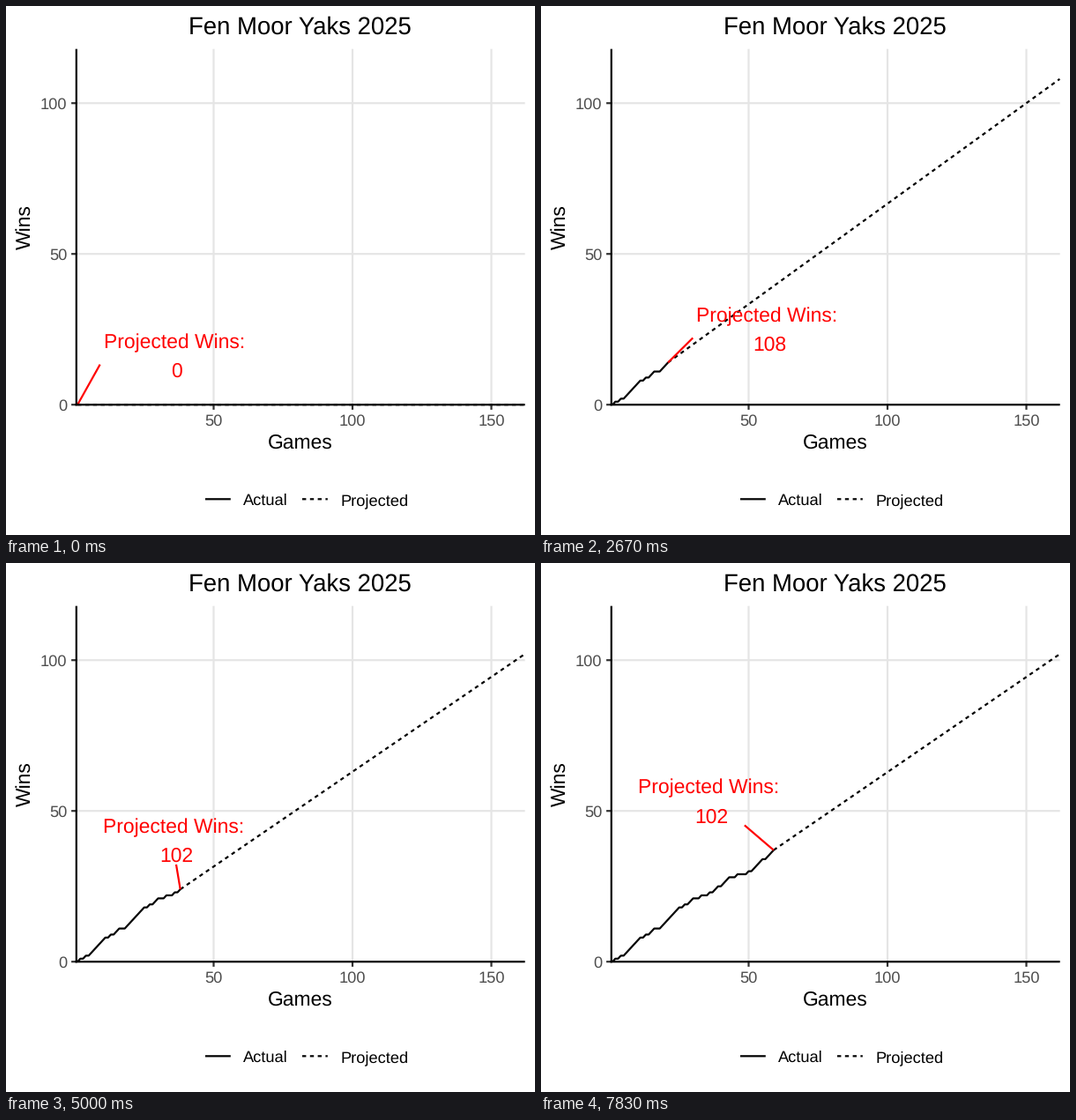
These frames come from a looping animation (600 px wide and 600 px high, 8000 ms). A matplotlib script:

```python
import matplotlib.pyplot as plt
import numpy as np
from matplotlib.animation import FuncAnimation

plt.rcParams["font.family"] = "Liberation Sans"
plt.rcParams["text.hinting"] = "no_hinting"

SIZE, DPI = 600, 100
LOOP, TICK, STEPS = 8000, 40, 48   # loop and tick in ms, chart steps per loop
LEAD = 34                          # ms; keeps steps from lagging a tick
SEASON = 162
PX = 72 / DPI                      # points per pixel
LINE = 2.2 * PX
LEFT, RIGHT, TOP, BOTTOM = 79.8, 588.6, 48.7, 452.2

RESULTS = ("LWLWL" + "W" * 6 + "LWLWWLL" + "W" * 7 + "LWLWW" + "LLWLL"
           + "WLWWL" + "WWWLL" + "WLLLW" + "LWWWW" + "LWWW")
WINS = np.cumsum([r == "W" for r in RESULTS])


def px(game):
    return 78 + 3.15 * game


def py(wins):
    return BOTTOM - 3.42 * wins


fig = plt.figure(figsize=(SIZE / DPI, SIZE / DPI), dpi=DPI, facecolor="white")
ax = fig.add_axes([0, 0, 1, 1])
ax.set_xlim(0, SIZE)
ax.set_ylim(SIZE, 0)
ax.axis("off")


def line(x, y, color="black", z=2, **kw):
    kw = {"lw": LINE, "solid_capstyle": "butt", "dash_capstyle": "butt",
          "solid_joinstyle": "round", "snap": False, **kw}
    return ax.plot(x, y, color=color, zorder=z, **kw)[0]


def text(x, y, s, size, color="black", ha="center", **kw):
    return ax.text(x, y, s, fontsize=size * PX, color=color, ha=ha,
                   va="baseline", **kw)


def draw_chart():
    grid, tick, grey = "#E5E5E5", "#333333", "#4D4D4D"
    for w in (0, 50, 100):
        y = py(w)
        line([LEFT, RIGHT], [y, y], grid, 1)
        line([LEFT - 5.7, LEFT], [y, y], tick, 4)
        text(69.5, y + 6.4, str(w), 18.3, grey, "right")
    for g in (50, 100, 150):
        x = px(g)
        line([x, x], [TOP, BOTTOM], grid, 1)
        line([x, x], [BOTTOM, BOTTOM + 5.7], tick, 4)
        text(x, 476, str(g), 18.3, grey)
    line([LEFT, LEFT], [TOP, BOTTOM + 1.1], z=5)
    line([LEFT - 1.1, RIGHT], [BOTTOM, BOTTOM], z=5)

    text(333.7, 32, "Fen Moor Yaks 2025", 27.5)
    text(334, 502, "Games", 22.9)
    text(28, 250.5, "Wins", 22.9, rotation=90, rotation_mode="anchor")
    line([226, 254.8], [559.3, 559.3])
    line([336, 364.8], [559.3, 559.3], ls=(0, (2, 2)))
    text(269.3, 566, "Actual", 18.3, ha="left")
    text(379.3, 566, "Projected", 18.3, ha="left")


draw_chart()
panel = plt.Rectangle((LEFT, TOP), RIGHT - LEFT, BOTTOM - TOP + 1.1,
                      transform=ax.transData)
actual = line([], [], clip_path=panel)
projected = line([], [], ls=(0, (2, 2)), clip_path=panel)
pointer = line([], [], "red", 3)
caption = text(0, 0, "Projected Wins:", 22.9, "red", zorder=6)
count = text(0, 0, "", 22.9, "red", zorder=6)


def place_label(game, x, y):
    """Return the label's centre and the end of its pointer."""
    if game >= 37:
        cx, cy = 190.3, y - 55.7
        tip = x + np.interp(game, [37, 38, 47, 59], [-2.5, -4.7, -24, -33])
        return cx, cy, tip, cy + 27.5
    stops = [1, 10, 21, 29, 36]
    cx = x + np.interp(game, stops, [109.5, 109.7, 112.1, 112.7, 112.7])
    cy = y - np.interp(game, stops, [55.7, 55.7, 37.6, 42.1, 46])
    # start at the lower left corner, slide towards the middle of the side
    ex, ey = cx - 84, cy + 27
    near, far = np.hypot(ex - x, ey - y), np.hypot(ex - x, cy - y)
    return cx, cy, ex, ey + (cy - ey) * near / far


def update(i):
    step = (i * TICK + LEAD) * STEPS // LOOP
    game = round(1 + step * 122 / 99)
    wins = int(WINS[game - 1])
    total = round(SEASON * wins / game)
    x, y = px(game), py(wins)

    games = np.arange(1, game + 1)
    actual.set_data(px(games), py(WINS[:game]))
    projected.set_data([x, px(SEASON)], [y, py(total)])

    cx, cy, ex, ey = place_label(game, x, y)
    pointer.set_data([x, ex], [y, ey])
    caption.set_position((cx, cy - 8.5))
    count.set_position((cx + 3.2, cy + 24.5))
    count.set_text(str(total))
    return actual, projected, pointer, caption, count


anim = FuncAnimation(fig, update, frames=LOOP // TICK, interval=TICK,
                     init_func=lambda: update(0), repeat=True, repeat_delay=0)
plt.show()
```
